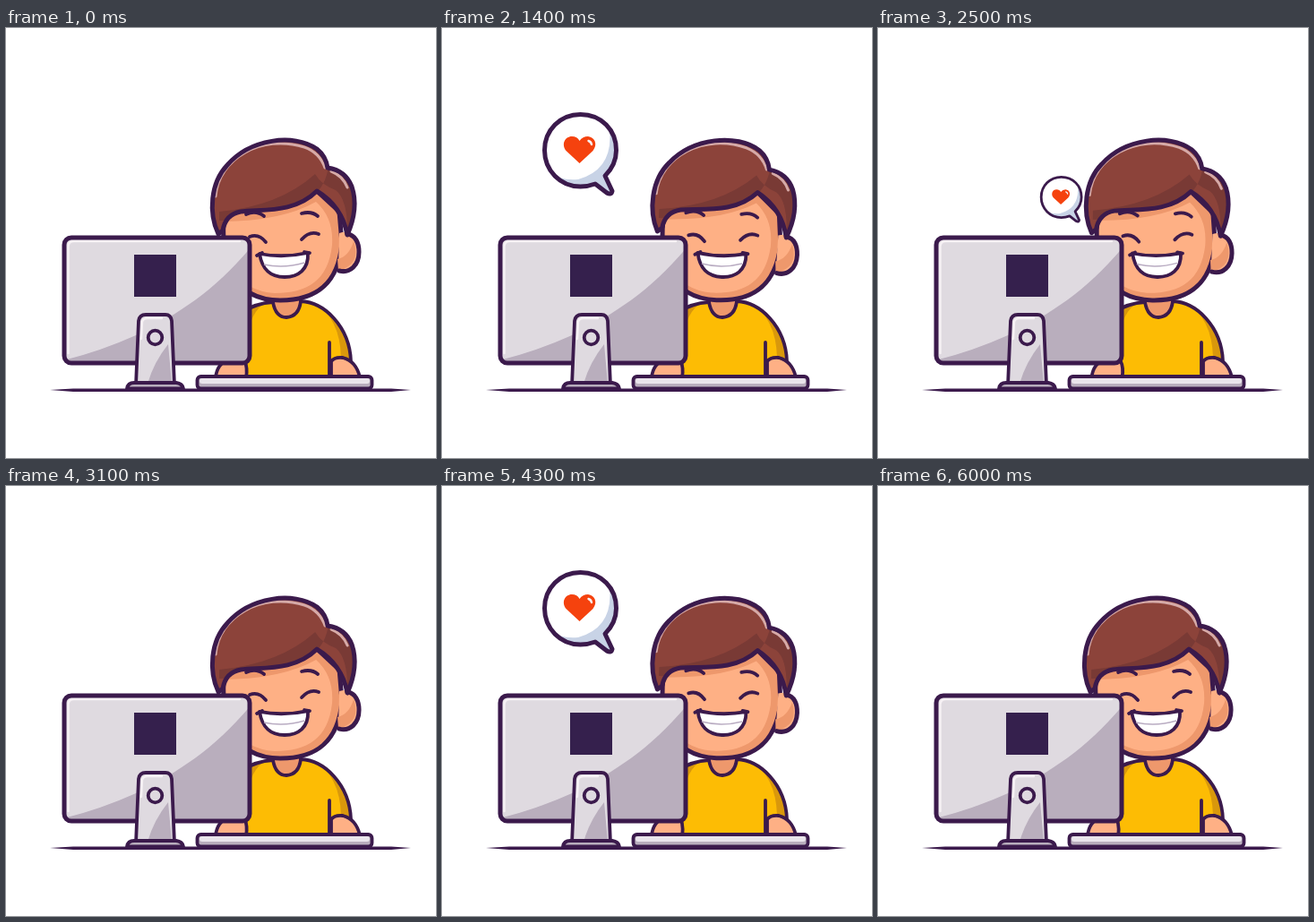
These frames come from a looping animation (480x480 px, 6100 ms). An HTML page:

```html
<!DOCTYPE html>
<html lang="en">
<head>
<meta charset="utf-8">
<title>Happy at the computer</title>
<style>
  html, body { margin: 0; width: 100%; height: 100%; overflow: hidden; background: #fff; }
  svg { display: block; width: 100vw; height: 100vh; }
  .ink { stroke: #3b1a4c; stroke-width: 5; stroke-linejoin: round; stroke-linecap: round; }
  .thin { stroke-width: 3.8; }
  .line { fill: none; }
  .skin { fill: #feb085; }
  .skin-dark { fill: #ee986c; }
  .hair { fill: #8c433a; }
  .hair-dark { fill: #793a35; }
  .metal { fill: #dfdae0; }
  .metal-dark { fill: #b9aebd; }
  .gloss { fill: none; stroke: #f7f2f5; stroke-width: 2.4; stroke-linecap: round; }
</style>
</head>
<body>
<svg viewBox="0 0 480 480">
  <defs>
    <rect id="screen" x="65" y="234" width="207" height="140" rx="8"/>
    <path id="balloon" d="M154.500 96.500C178 96.500 194.500 114 194.500 136.500C194.500 148 190 157 182 165L190 182Q189 187 184 184L171 174Q163 177 154.500 177C132 177 114.500 159 114.500 136.500C114.500 114 132 96.500 154.500 96.500Z"/>
    <path id="face" d="M244 206C238 258 252 304 306 304C346 304 371 286 375 240L372 205L347 182Z"/>
    <path id="shirt" d="M262 390V318Q279 307 298 306Q301 323 313 323Q327 322 329 305Q350 306 366 324Q384 344 385 372L378 390Z"/>
    <path id="hair" d="M237 230C226 207 228 173 247 153C272 124 321 117 347 135Q357 143 359 156Q379 159 386 177C392 195 388 215 381 231Q375 199 347 182C322 207 286 202 262 205Q245 208 242 226Z"/>
    <clipPath id="screenClip"><use href="#screen"/></clipPath>
    <clipPath id="balloonClip"><use href="#balloon"/></clipPath>
    <clipPath id="faceClip"><use href="#face"/></clipPath>
    <clipPath id="shirtClip"><use href="#shirt"/></clipPath>
    <clipPath id="hairClip"><use href="#hair"/></clipPath>
  </defs>

  <g id="bubble">
    <use href="#balloon" fill="#fff"/>
    <path clip-path="url(#balloonClip)" fill="#c8d3e6" d="M187 112Q192 158 152 169Q132 171 119 160L145 188H200V112Z"/>
    <use href="#balloon" class="ink line"/>
    <path fill="#f5420e" d="M153.500 151L138.500 137C133 130 137 121 145 121Q151 121 153.500 126Q157 121 163 121C171 122 174 130 168.500 137Z"/>
    <path class="gloss" d="M163.500 126Q166.500 127 167 130"/>
  </g>

  <path class="ink thin skin-dark" d="M298 299V313Q301 324 313 324Q326 323 329 312V299Z"/>
  <use href="#shirt" fill="#fdbc04"/>
  <path clip-path="url(#shirtClip)" fill="#d9980c" d="M340 303Q373 322 374 368L368 390H395V303ZM262 306H290Q272 318 270 345V390H262Z"/>
  <use href="#shirt" class="ink line thin"/>
  <path class="ink line thin" d="M361 351V388"/>

  <g id="head">
    <use href="#face" class="skin"/>
    <path clip-path="url(#faceClip)" class="skin-dark" fill-rule="evenodd" d="M230 170H385V310H230ZM240 216Q307 216 346 194Q366 212 364 242C360 282 336 296 300 296Q268 294 255 270Z"/>
    <use href="#face" class="ink line"/>
    <path class="skin" d="M372 229C387 224 394 236 394 250C394 265 384 274 371 271Z"/>
    <path class="skin-dark" d="M370 258Q383 255 388 238Q397 264 371 271Z"/>
    <path class="ink line" d="M381 230C390 231 394 240 394 250C394 265 384 274 372 271"/>
    <use href="#hair" class="hair"/>
    <g clip-path="url(#hairClip)">
      <path class="hair-dark" d="M238 205Q305 199 345 163Q352 175 368 181Q382 192 381 232H394V165L360 154Q357 176 343 187L300 215H238Z"/>
      <path class="gloss" style="stroke:#d6aaa8;stroke-width:3" d="M234 188C237 146 285 118 333 133Q350 139 356 156M363 160Q376 165 381 178"/>
    </g>
    <use href="#hair" class="ink line"/>
    <g class="line ink thin">
      <path d="M268 208Q279 203 288 210M330 207Q341 204 348 210"/>
      <path d="M272 233Q282 229 290 239M330 236Q339 226 349 230"/>
    </g>
    <path class="ink thin" fill="#fff" d="M283 252Q309 257 337 251C338 270 326 278 311 278C295 278 286 270 283 252Z"/>
    <path fill="none" stroke="#b9acc2" stroke-width="1.500" d="M288 264Q310 269 333 262"/>
    <path class="ink line thin" d="M280 254L286 251M333 250L339 251"/>
  </g>

  <path class="ink thin skin" id="hand" d="M234 390Q236 374 248 371H266Q270 379 268 390Z"/>
  <path class="ink thin skin" d="M363 390V372Q367 367 376 368Q391 372 395 390Z"/>

  <path fill="#3b1a4c" d="M49 404L75 402.600H430L452 404L430 406H75Z"/>

  <use href="#screen" class="metal"/>
  <g clip-path="url(#screenClip)">
    <path class="metal-dark" d="M275 243C232 294 196 317 145 343Q105 361 64 371V380H275Z"/>
    <path class="gloss" d="M69.500 363V244Q69.500 238 76 238H261"/>
  </g>
  <use href="#screen" class="ink line"/>
  <rect x="143" y="253" width="47" height="47" fill="#35204d"/>

  <path class="ink thin metal" d="M145 399L148 327Q149 320 156 320H178Q184 320 185 327L188 399Z"/>
  <path class="metal-dark" d="M181 353L185 397H158Q165 373 181 353Z"/>
  <path class="gloss" d="M151 347L152 328Q153 324 158 324H174"/>
  <circle class="ink thin metal" cx="166.500" cy="345.500" r="7.800"/>
  <path class="ink thin metal-dark" d="M135 402.500Q136 396 143 396H190Q197 397 198 402.500Z"/>
  <rect class="ink thin metal-dark" x="213.500" y="389" width="195" height="13.500" rx="4"/>
  <path stroke="#e9e4eb" stroke-width="6" stroke-linecap="round" d="M219 394H403"/>
</svg>
<script>
const LOOP = 6100, STEP = 100, BACK = 1.37;
const [bubble, head, hand] = ['bubble', 'head', 'hand'].map(id => document.getElementById(id));

const backIn = p => p * p * ((BACK + 1) * p - BACK);
const backOut = p => 1 - backIn(1 - p);
const sine = p => (1 - Math.cos(Math.PI * p)) / 2;
const progress = (t, start, length) => Math.min(1, Math.max(0, (t - start) / length));

// Rises from 0 to 1 at "up" and returns at "down"
const pulse = (t, up, down, length, rise, fall) =>
  rise(progress(t, up, length)) - fall(progress(t, down, length));

const pop = (t, up, down) => pulse(t, up, down, 500, backOut, backIn);
const lean = (t, up, down) => pulse(t, up, down, 1100, sine, sine);

function draw(now) {
  const t = Math.floor(now % LOOP / STEP) * STEP;
  const size = pop(t, 100, 2080) + pop(t, 3100, 5490);
  const angle = 2.4 * (lean(t, 0, 1900) + lean(t, 3000, 5000));
  const slide = 4.5 * Math.sin(Math.PI * progress(t, 2100, 800));

  bubble.setAttribute('visibility', size > .01 ? 'visible' : 'hidden');
  bubble.setAttribute('transform', `translate(269 256) scale(${size}) translate(-269 -256)`);
  head.setAttribute('transform', `rotate(${angle} 312 310)`);
  hand.setAttribute('transform', `translate(${slide} 0)`);
}

const start = performance.now();
function tick() {
  draw(performance.now() - start);
  requestAnimationFrame(tick);
}
tick();
</script>
</body>
</html>
```
